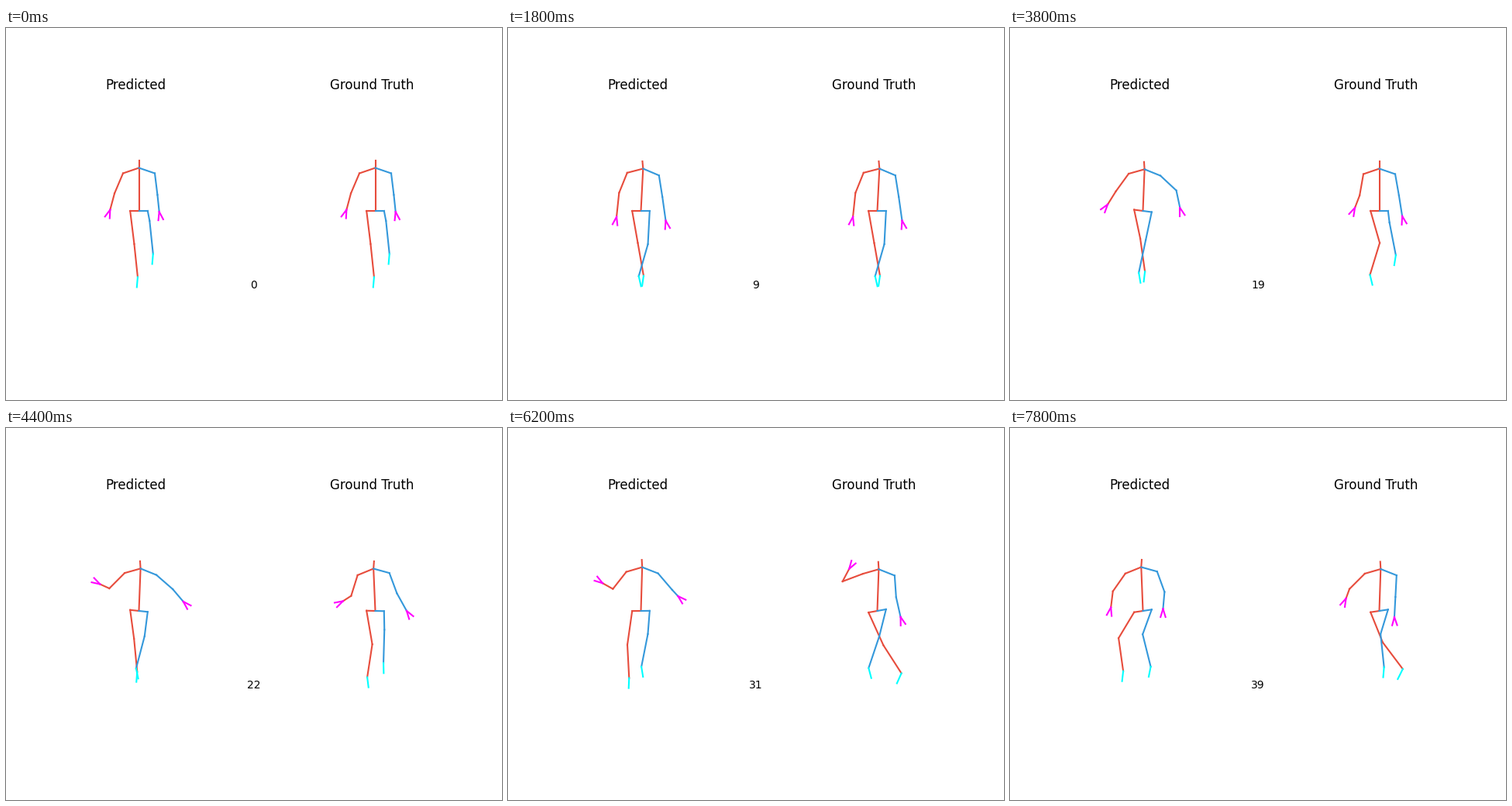
Recreate the animation shown at these times as a matplotlib script. Size 640x480 px, loop 8000 ms.

```python
import numpy as np
import matplotlib.pyplot as plt
from matplotlib.animation import FuncAnimation

W, H, DPI = 640, 480, 100
FRAMES, STEP = 40, 200
RED, BLUE, MAGENTA, CYAN = "#e74c3c", "#3498db", "#ff00ff", "#00ffff"

# Points are complex numbers, x + y*1j, in pixels.
PELVIS = 171.7 + 236j
UPPER_ARM, SHIN, HAND = 28, 43, 11

# Key poses: neck x, neck y, hip tilt; then for right and left
# arm: upper angle, forearm angle and visible length; then for right and left
# leg: thigh angle and visible length, shin angle.
# Angles are degrees from straight down, positive away from the body.
WALK = {
    0: (171.7, 180.5, 0, 23, 15, 22, 7, 6, 22, -7, 43, -6, 11, 13, 6),
    9: (174.5, 181.5, 0, 22, 6, 31, 9, 8, 31, -10, 42, -10, -3, 43, -16),
}
PREDICTED = {
    **WALK,
    15: (172.8, 182.5, -1.5, 15, 23, 26, 29, 163, 5, -11, 43, -10, -8, 42, -9),
    19: (173.8, 182.3, -1.5, 36, 32, 20, 47, 12, 23, -12, 38, -8, -12, 37, -12),
    26: (173.8, 180, -.5, 51, 231, 7, 50, 84, 16, 2, 37, -3, 0, 27, -17),
    35: (172.5, 179.5, .7, 29, 24, 21, 29, 5, 9, 14, 49, -3, -11, 33, -2),
    39: (169.5, 179.5, 1.7, 35, 7, 21, 20, -5, 22, 31, 39, -8, -20, 34, 14),
}
TRUTH = {
    **WALK,
    15: (176.3, 182, 0, 14, 12, 24, -3, -3, 29, -22, 40, -1, -2, 35, -17),
    19: (171.7, 181.5, 0, 10, 21, 17, 10, 9, 27, -16, 43, 17, 7, 15, 11),
    26: (167.7, 181.5, -.7, 37, 133, 9, 29, 50, 25, -4, 45, -11, -10, 38, -21),
    35: (177.8, 182.8, 4, 85, 276, 25, -14, -14, 27, -39, 47, -42, -16, 34, -14),
    39: (173.5, 182, 1.7, 45, 380, 13, -3, -3, 26, -22, 42, -37, -17, 33, 6),
}


def smooth(t, keys, ts):
    """Monotone cubic through the keys, without overshoot."""
    h = np.diff(t)
    d = np.diff(keys) / h
    m = np.concatenate([d[:1], np.zeros(len(d) - 1), d[-1:]])
    for i in range(1, len(d)):
        if d[i - 1] * d[i] > 0:
            m[i] = 2 * d[i - 1] * d[i] / (d[i - 1] + d[i])
    i = np.clip(np.searchsorted(t, ts, side="right") - 1, 0, len(h) - 1)
    u = (ts - t[i]) / h[i]
    return ((1 + 2 * u) * (1 - u) ** 2 * keys[i] + u * (1 - u) ** 2 * h[i] * m[i]
            + u * u * (3 - 2 * u) * keys[i + 1] + u * u * (u - 1) * h[i] * m[i + 1])


def bone(side, angle, length):
    a = np.radians(angle)
    return length * (side * np.sin(a) + 1j * np.cos(a))


def arm(neck, side, upper, fore, reach):
    """Joints from neck to wrist, and the two-pronged hand."""
    lean = neck.real - PELVIS.real
    shoulder = neck + side * 20.5 + 1j * (7 + side * 0.6 * lean)
    elbow = shoulder + bone(side, upper, UPPER_ARM)
    wrist = elbow + bone(side, fore, reach)
    prongs = [wrist + bone(side, fore + spread, HAND) for spread in (22, -12)]
    return [neck, shoulder, elbow, wrist], [prongs[0], wrist, prongs[1]]


def leg(pelvis, side, tilt, thigh, reach, shin):
    """Joints from pelvis to ankle, and the foot trailing against the shin."""
    hip = pelvis + side * (11.3 - 1j * tilt)
    knee = hip + bone(side, thigh, reach)
    ankle = knee + bone(side, shin, SHIN)
    toe = ankle + 13j - 0.25 * (ankle - knee).real
    return [pelvis, hip, knee, ankle], [ankle, toe]


def skeleton(poses):
    """Coloured joint chains; every joint is its path over all frames."""
    ts = np.arange(FRAMES)
    t = np.array(list(poses))
    p = [smooth(t, np.array(col, float), ts) for col in zip(*poses.values())]
    # Arms swing outwards during the first stride
    swing = 14 * np.sin(np.pi * np.minimum(ts, 9) / 9)
    for k in (3, 4, 6, 7):
        p[k] = p[k] + swing

    pelvis = np.full(FRAMES, PELVIS)
    neck, tilt = p[0] + 1j * p[1], p[2]
    head = neck - 9.5j - 0.3 * (neck - pelvis).real
    r_arm, r_hand = arm(neck, -1, *p[3:6])
    l_arm, l_hand = arm(neck, 1, *p[6:9])
    r_leg, r_foot = leg(pelvis, -1, tilt, *p[9:12])
    l_leg, l_foot = leg(pelvis, 1, tilt, *p[12:15])
    return [(RED, [head, neck, pelvis]), (RED, r_arm), (RED, r_leg),
            (BLUE, l_arm), (BLUE, l_leg), (MAGENTA, r_hand),
            (MAGENTA, l_hand), (CYAN, r_foot), (CYAN, l_foot)]


plt.rcParams["font.family"] = "DejaVu Sans"
fig = plt.figure(figsize=(W / DPI, H / DPI), dpi=DPI, facecolor="white")
ax = fig.add_axes([0, 0, 1, 1])
ax.set(xlim=(0, W), ylim=(H, 0))
ax.axis("off")

bones = []
for title, x, poses, dx in (("Predicted", 167, PREDICTED, -0.2),
                            ("Ground Truth", 472, TRUTH, 304.8)):
    ax.text(x, 79, title, fontsize=12, ha="center", va="baseline")
    for color, chain in skeleton(poses):
        for a, b in zip(chain, chain[1:]):
            line, = ax.plot([], [], color=color, lw=1.5)
            bones.append((line, a + dx, b + dx))
counter = ax.text(320, 336, "0", fontsize=10, ha="center", va="baseline")


def draw(i):
    for line, a, b in bones:
        line.set_data([a[i].real, b[i].real], [a[i].imag, b[i].imag])
    counter.set_text(str(i))
    return [line for line, _, _ in bones] + [counter]


anim = FuncAnimation(fig, draw, frames=FRAMES, interval=STEP, repeat=True,
                     repeat_delay=0)
plt.show()
```
